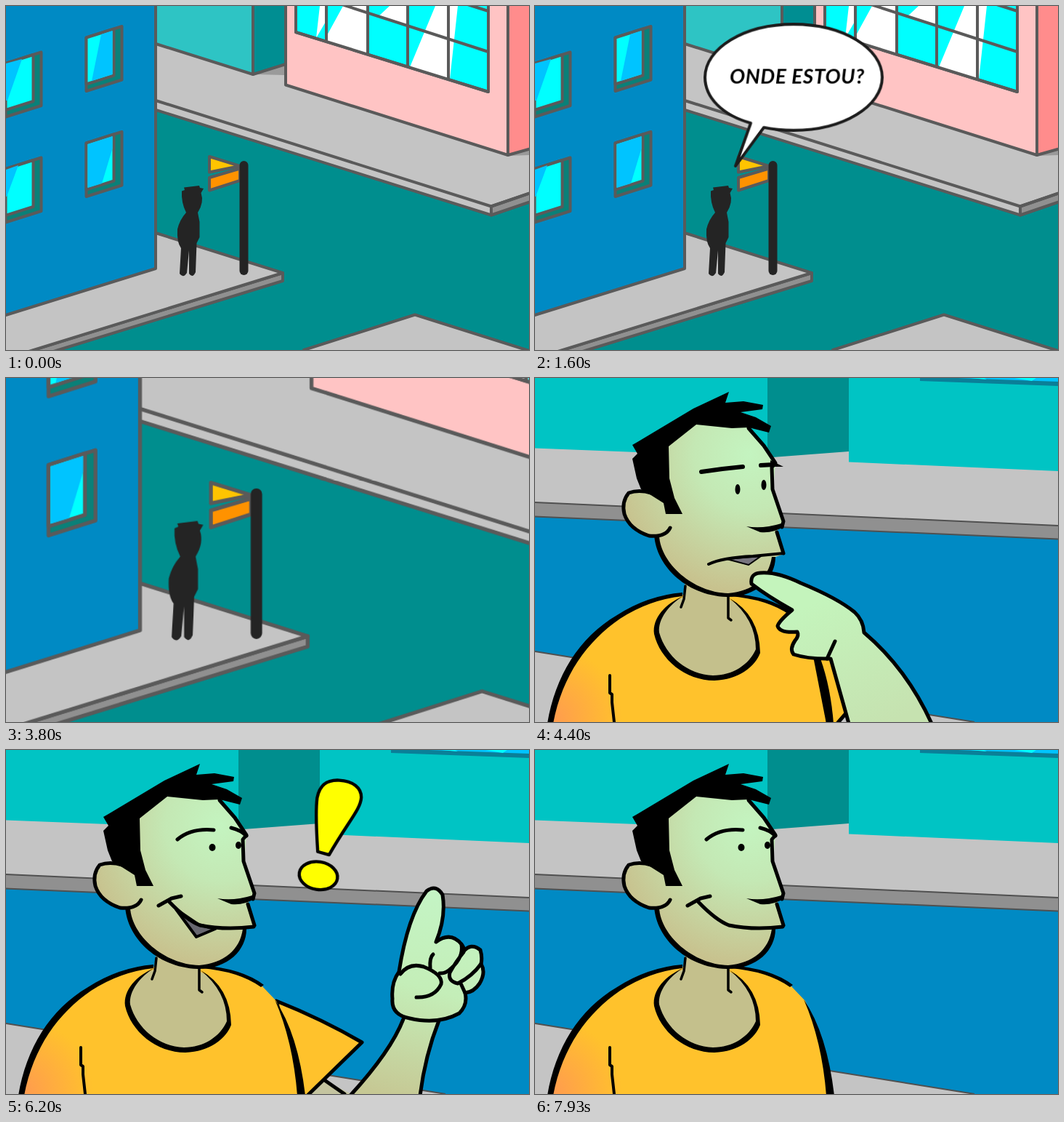
These frames come from a looping animation (720 by 473 pixels, 8 s). An HTML page:

```html
<!DOCTYPE html>
<html lang="pt">
<head>
<meta charset="utf-8">
<title>Onde estou?</title>
<style>
html, body { margin: 0; width: 100%; height: 100%; overflow: hidden; background: #008e8e; }
svg { display: block; width: 100vw; height: 100vh; }
svg * { animation-duration: 8s; animation-iteration-count: infinite; animation-timing-function: linear; }

#street { animation-name: street; animation-timing-function: step-end; }
#close { animation-name: close; animation-timing-function: step-end; }
@keyframes street { 0% { visibility: visible; } 51.6%, 100% { visibility: hidden; } }
@keyframes close { 0% { visibility: hidden; } 51.6%, 100% { visibility: visible; } }

#camera { transform-origin: 273.5px 405px; animation-name: zoom; }
@keyframes zoom {
  0%, 40.875% { transform: scale(1); animation-timing-function: cubic-bezier(.35, .1, .8, .8); }
  47.5% { transform: scale(1.318); }
  51.6%, 100% { transform: scale(1.57); }
}

#bubble { transform-origin: 276px 220px; animation-name: bubble; }
@keyframes bubble {
  0%, 4% { transform: scale(0); opacity: 1; animation-timing-function: ease-out; }
  7.2% { transform: scale(1.04); }
  8.2%, 40% { transform: scale(1); opacity: 1; }
  41.6%, 100% { transform: scale(1); opacity: 0; }
}

#eyes { animation-name: look; }
@keyframes look {
  0%, 60% { transform: translate(0, 0); }
  61%, 100% { transform: translate(-18px, 0); }
}
#eye2 { animation-name: look2; }
@keyframes look2 {
  0%, 60% { transform: translate(0, 0); }
  61%, 100% { transform: translate(12px, 0); }
}

#think { animation-name: think; animation-timing-function: step-end; }
#happy { animation-name: happy; animation-timing-function: step-end; }
#open { animation-name: open; animation-timing-function: step-end; }
@keyframes think { 0% { opacity: 1; } 73.4%, 100% { opacity: 0; } }
@keyframes happy { 0% { opacity: 0; } 73.4%, 100% { opacity: 1; } }
@keyframes open { 0% { opacity: 0; } 75% { opacity: 1; } 92%, 100% { opacity: 0; } }

#raised { transform-origin: 400px 473px; animation-name: raise; }
@keyframes raise {
  0%, 73.4% { transform: translate(-60px, 310px) rotate(20deg); animation-timing-function: ease-out; }
  77%, 91.5% { transform: none; animation-timing-function: ease-in; }
  95.5%, 100% { transform: translate(-60px, 310px) rotate(20deg); }
}

#idea { transform-origin: 430px 185px; animation-name: pop; }
@keyframes pop {
  0%, 76% { transform: scale(0); animation-timing-function: ease-out; }
  78.5% { transform: scale(1.1); }
  80%, 91% { transform: scale(1); }
  92.5%, 100% { transform: scale(0); }
}

.edge { stroke: #5a5a5a; stroke-width: 4; stroke-linejoin: round; }
.ink { fill: none; stroke: #000; stroke-width: 5; stroke-linecap: round; stroke-linejoin: round; }
.skin { fill: url(#skin); }
.shirt { fill: url(#shirt); }
text { font: italic 700 28px Lato, "Open Sans", sans-serif; letter-spacing: .6px; }
</style>
</head>
<body>
<svg viewBox="0 0 720 473" preserveAspectRatio="none">
<defs>
  <radialGradient id="skin" gradientUnits="userSpaceOnUse" cx="295" cy="105" r="190">
    <stop offset="0" stop-color="#c4f4c0"/>
    <stop offset=".4" stop-color="#c4e8b4"/>
    <stop offset="1" stop-color="#c8c28e"/>
  </radialGradient>
  <linearGradient id="hand" gradientUnits="userSpaceOnUse" x1="400" y1="300" x2="490" y2="473">
    <stop offset="0" stop-color="#c4f4bc"/>
    <stop offset="1" stop-color="#c6e2b0"/>
  </linearGradient>
  <linearGradient id="arm" gradientUnits="userSpaceOnUse" x1="590" y1="200" x2="520" y2="473">
    <stop offset="0" stop-color="#c4f4c4"/>
    <stop offset=".45" stop-color="#c4eeb8"/>
    <stop offset="1" stop-color="#c6c894"/>
  </linearGradient>
  <radialGradient id="shirt" gradientUnits="userSpaceOnUse" cx="20" cy="470" r="100">
    <stop offset="0" stop-color="#ff9a50"/>
    <stop offset="1" stop-color="#ffc22c"/>
  </radialGradient>
  <g id="frame" class="edge">
    <path d="M110.500 43.500 159.500 28V101.500L110.500 117Z" fill="#0a8078"/>
    <path d="M110.500 43.500 148.500 31.500V95.500L110.500 107.500Z" fill="#00ffff"/>
  </g>
</defs>

<g id="street">
  <g id="camera">
    <rect width="720" height="473" fill="#008e8e"/>
    <g class="edge">
      <path d="M200 40H740V263L668 287.500 200 141Z" fill="#c4c4c4"/>
      <path d="M668 275.500 740 251V263L668 287.500Z" fill="#909090"/>
      <path d="M200 128 668 275.500 740 251" fill="none"/>
    </g>
    <path d="M342 94 384 82V95ZM692 206 720 197V205Z" fill="#9a9a9a"/>
    <g class="edge">
      <path d="M200-5H340V94L200 50Z" fill="#2ec4c4"/>
      <path d="M340-5H385V80L340 94Z" fill="#008e92"/>
      <path d="M385-5H691V205L385 108.500Z" fill="#ffc4c4"/>
      <path d="M691-5H730V194L691 205Z" fill="#ff8c8c"/>
      <path d="M399-5V36L664 118V-5Z" fill="#00ffff"/>
    </g>
    <path d="M432 0H441V20L427 44ZM464 0H498V67L441 49V42ZM528 0H553V28L513 14ZM591 0H622L611 101 556 84Z" fill="#fff"/>
    <path class="edge" fill="none" d="M441-5V49M498-5V67M553-5V84M609-5V101M664 63 441-9M664 7 620-7M399-5V36L664 118V-5"/>

    <path class="edge" d="M410 473 563 424.500 720 474V490H400Z" fill="#c4c4c4"/>
    <g class="edge">
      <path d="M381 367V378L72 473-30 505V494Z" fill="#909090"/>
      <path d="M206 312 381 367-30 494V400Z" fill="#c4c4c4"/>
      <path d="M-10-10H206V361L-10 428Z" fill="#008ac4"/>
    </g>
    <use href="#frame"/>
    <path d="M131 39 146.500 34V94L118 103Z" fill="#00c4ff"/>
    <use href="#frame" y="145"/>
    <path d="M112.500 190 146.500 179V196L132 244 112.500 250Z" fill="#00c4ff"/>
    <use href="#frame" x="-111" y="35.500"/>
    <path d="M0 79 22 73 2 130H0Z" fill="#00c4ff"/>
    <use href="#frame" x="-111" y="180.500"/>
    <path d="M0 225 17 219 1 262H0Z" fill="#00c4ff"/>

    <g class="edge">
      <path d="M280 207 322 220 280 228.500Z" fill="#ffc400"/>
      <path d="M280 236 322 223.500V240L280 253.500Z" fill="#ff9200"/>
    </g>
    <path d="M327.500 219V364" stroke="#242424" stroke-width="12" stroke-linecap="round"/>
    <path fill="#242424" d="M242 254.500 246 253 245 249.500 266 247 267 250 272 251 268.500 257Q273 270 264 284L266.500 297V318L262.500 326 261 366Q257 375 252 368L252 336 249 367Q244 375 239 368L241 333Q235 325 236 307 239 294 248 284 241 270 242 254.500Z"/>
  </g>
  <g id="bubble">
    <path d="M297 161C258 150 234 126 234 98C234 58 288 25 356 25S478 58 478 98 424 171 356 171Q334 171 315 167L276 220Z" fill="#fff" stroke="#1c1c1c" stroke-width="4" stroke-linejoin="round"/>
    <text x="361" y="107" text-anchor="middle">ONDE ESTOU?</text>
  </g>
</g>

<g id="close">
  <rect width="720" height="473" fill="#c4c4c4"/>
  <path d="M0 0H320V109L0 96.500ZM432 0H720V128L432 115.500Z" fill="#00c4c4"/>
  <path d="M320 0H432V101L320 109.500Z" fill="#008e8e"/>
  <path d="M530 0H720V11L530 4Z" fill="#0a7f98"/>
  <path d="M582 0H720V5Z" fill="#00c4ff"/>
  <path d="M600 0H618L622 2ZM660 0H690L684 4Z" fill="#00ffff"/>
  <path d="M0 171 720 203V221L0 190Z" fill="#909090"/>
  <path d="M0 190 720 221V473H605L0 376Z" fill="#008ac4"/>
  <path d="M0 171 720 203M0 190.500 720 221.500M0 376 605 473" fill="none" stroke="#505050" stroke-width="2"/>

  <g id="raised">
    <path d="M412 473 440 455 475 473Z" fill="#c4c4a0"/>
    <path d="M470 478Q530 414 547 366L596 370Q578 420 570 478Z" fill="url(#arm)"/>
    <path class="ink" d="M474 475Q530 414 547 370M596 372Q577 420 570 475M440 455 466 473"/>
    <path class="ink" style="fill:url(#arm)" d="M541 305Q553 228 579 194 592 184 601 199 606 230 592 264 612 249 627 267 632 273 629 278 640 264 653 275 656 285 654 294 661 306 652 321 644 333 632 334 636 350 624 362 595 378 556 369 530 364 532 342 530 320 541 305Z"/>
    <path class="ink" d="M543 308Q555 292 575 298 602 309 599 322 590 341 565 340M584 300Q583 285 588 281M627 267Q630 285 613 300 605 308 597 307M630 278Q620 290 611 306 608 318 622 321 642 311 654 294M626 321 632 334"/>
    <path class="ink shirt" d="M372 345Q435 370 490 402L412 478H408Z"/>
  </g>

  <path class="shirt" d="M22 473C32 410 64 360 115 328Q155 302 203 298H268Q318 300 352 324L372 345Q400 400 409 478H22Z"/>
  <path d="M17 475C28 410 60 357 113 326Q155 299 203 295V300Q157 305 117 331C72 362 38 408 25 475Z"/>
  <path d="M268 296Q325 300 355 323L351 326Q320 304 268 300Z"/>
  <path d="M370 343Q402 390 412 475H401Q395 400 370 343Z"/>
  <path class="ink" style="stroke-width:4" d="M103 409V433L106 435V446L109 473"/>
  <path d="M207 280H268V305C298 320 306 345 307 375C300 397 274 414 245 414C205 412 172 383 166 350C164 330 182 310 203 302Z" fill="#c4c08c"/>
  <path d="M204 300C180 310 161 330 164 352C172 387 207 416 247 416C280 415 303 397 310 378Q309 326 268 303 304 332 304 373C295 394 272 409 245 409C211 408 180 383 171 350C169 332 184 312 204 300Z"/>
  <path class="ink" style="stroke-width:3.500" d="M207 286 205 304 201 315M266 297V330L270 333"/>

  <path class="skin" d="M184 90 222 62 293 67 331 118 328 153 342 201 332 211 343 242 328 247Q322 275 300 291 282 299 262 298C220 296 171 260 168 216L180 160Z"/>
  <path d="M164 212C164 255 206 299 264 301C306 301 331 275 331 246L326 246C322 275 300 293 266 296C218 295 173 255 171 217Z"/>
  <path class="skin" d="M202 187Q170 153 143 156 121 159 122 184 128 207 157 217 180 219 186 206Z"/>
  <path class="ink" d="M160 158Q143 153 129 158 119 170 123 187 130 208 157 217 180 219 186 206"/>
  <path d="M134 92 141 88 218 42 267 19 262 34 287 32 314 37 313 43 283 47 304 54 325 66 322 75 294 68 271 69 222 64 184 94 185 138 192 165 203 187 180 187 177 172 158 160 146 153 140 138 134 111 141 104Z"/>
  <path class="ink" d="M294 69 315 93 331 117 326 123 327 153 342 197 340 205M333 212 342 241"/>
  <path d="M291 204Q313 208 339 200L343 204Q327 214 310 212Z"/>

  <g id="think">
    <path class="ink" style="stroke-width:6" d="M229 129 258 125 286 122M311 120 329 119"/>
    <path d="M324 113 342 122H324Z"/>
    <g id="eyes">
      <ellipse cx="279" cy="153" rx="3.500" ry="7"/>
      <ellipse id="eye2" cx="315" cy="147" rx="3.500" ry="7"/>
    </g>
    <path d="M264 249 294 257 311 245Z" fill="#77757f" stroke="#000" stroke-width="2"/>
    <path class="ink" style="stroke-width:4" d="M239 256Q258 247 300 245L342 241"/>
    <path class="shirt" d="M390 370 407 385 429 460 418 473H409Z"/>
    <path class="ink" d="M429 460 416 475"/>
    <path d="M383 383 393 386Q407 425 411 475H401Z"/>
    <path class="ink" style="fill:url(#hand)" d="M432 475 407 386 402 386Q374 386 356 380 350 373 358 361 364 354 361 349 337 351 334 341 336 334 354 319 320 300 298 283 296 269 310 268 333 266 366 282 417 303 440 322 452 333 453 350 512 400 546 475"/>
    <path class="ink" d="M402 386 413 362"/>
  </g>

  <g id="happy">
    <path class="ink" d="M236 123Q255 107 286 110M310 107Q323 110 331 118"/>
    <ellipse cx="284" cy="134" rx="4.500" ry="5"/>
    <ellipse cx="320" cy="131" rx="4" ry="5"/>
    <path id="open" d="M234 219 262 257 288 246 265 240Z" fill="#686870" stroke="#000" stroke-width="4" stroke-linejoin="round"/>
    <path class="ink" d="M210 214 228 204 241 201M225 209Q249 234 267 241 301 248 341 243"/>
  </g>

  <g id="idea" fill="#ff0" stroke="#000" stroke-width="5" stroke-linejoin="round">
    <path d="M428 48C432 27 444 19 463 20C485 21 498 32 498 47C497 66 478 84 447 138L429 133Q425 72 428 48Z"/>
    <ellipse cx="430" cy="171" rx="30.500" ry="22" transform="rotate(9 430 171)"/>
  </g>
</g>
</svg>
</body>
</html>
```
